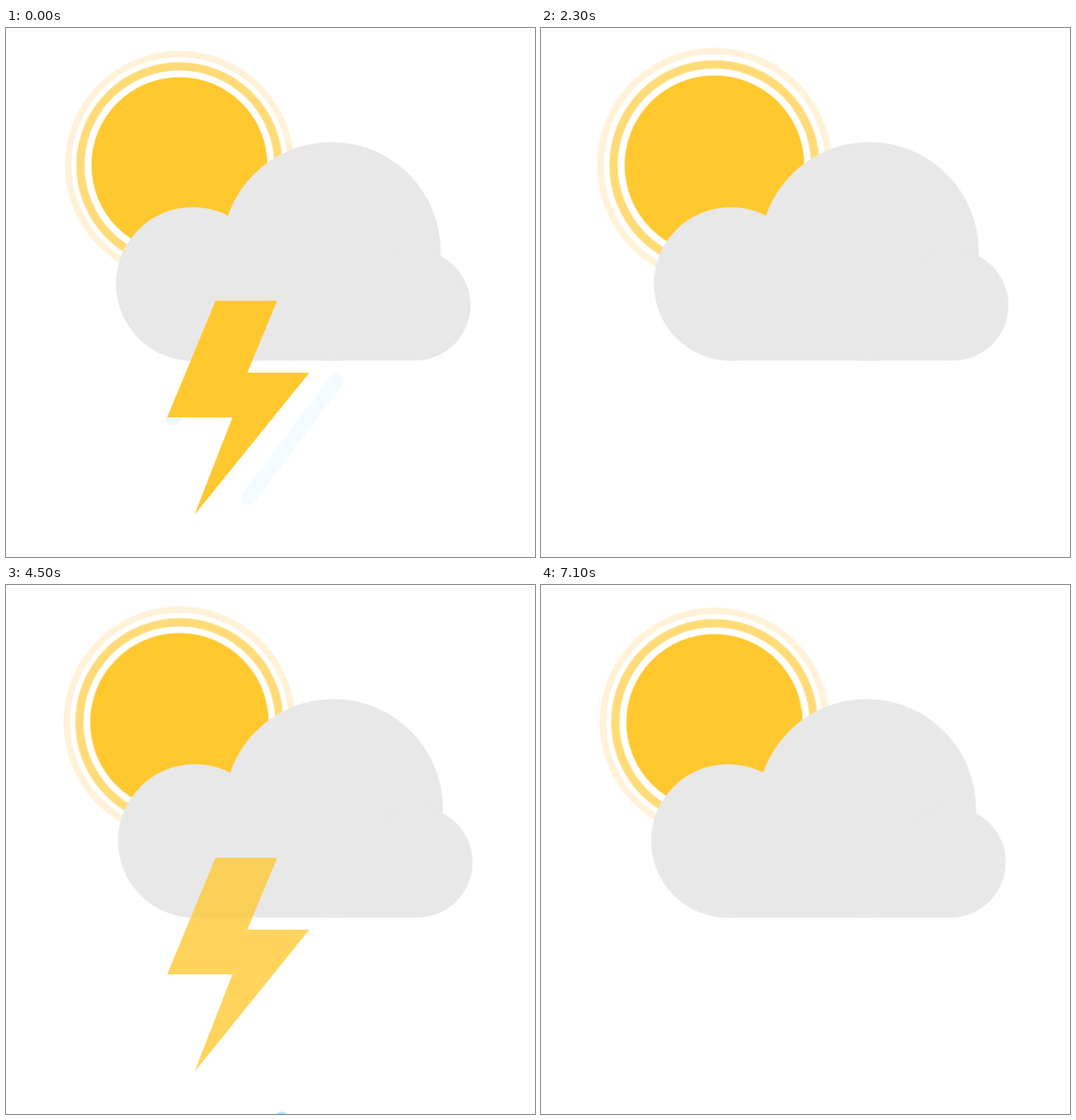
An HTML page for the animation above (7.2 s loop, 640x640 px).

```html
<!DOCTYPE html>
<html lang="en">
<head>
<meta charset="utf-8">
<title>Thunderstorm</title>
<style>
  html, body { margin: 0; width: 100%; height: 100%; overflow: hidden; background: #fff; }
  svg { display: block; width: 100%; height: 100%; }

  .core { fill: #ffc82f; animation: core 1.8s linear infinite alternate; }
  .ring { fill: none; stroke: #ffdb78; stroke-width: 10; animation: ring 1.8s linear -3.5s infinite alternate; }
  .halo { fill: none; stroke: #fff2d9; stroke-width: 8; animation: halo 7.2s linear infinite; }
  .cloud { fill: #e8e8e8; animation: drift 1.8s linear infinite alternate; }
  .drops { stroke: #abe8ff; stroke-width: 18; stroke-linecap: round; }
  .bolt { fill: #ffc82f; }

  @keyframes core { to { transform: scale(1.028); } }
  @keyframes ring { to { transform: scale(1.026); } }
  @keyframes halo {
    32% { transform: scale(1.026); }
    54% { transform: scale(1.006); }
    84% { transform: scale(1.029); }
  }
  @keyframes drift { to { transform: translateX(5px); } }
</style>
</head>
<body>
<svg viewBox="0 0 640 640">
  <g transform="translate(209.8 166)">
    <circle class="halo" r="134.6"/>
    <circle class="ring" r="119.6"/>
    <circle class="core" r="106.5"/>
  </g>
  <g class="cloud">
    <circle cx="226" cy="309.7" r="93"/>
    <circle cx="393.6" cy="270.3" r="132.4"/>
    <circle cx="495" cy="335.4" r="66.9"/>
    <rect x="226" y="310" width="269" height="92.4"/>
  </g>
  <g class="drops"></g>
  <polygon class="bolt" points="253.5,330 328,330 292,417 367,417 228,589 274,471 195,471"/>
</svg>
<script>
  const LOOP = 7200, SLOPE = 0.75, FADE = 2.4;
  const bolt = document.querySelector('.bolt');
  const layer = document.querySelector('.drops');

  // x, y: head of the streak at its start; len: its height
  const drops = [
    { x: 400, y: 426, len: 142, start: 28.2, end: 42, speed: 6.3, power: 1.53 },
    { x: 221.5, y: 445, len: 16, start: 27.9, end: 36, speed: 17.5 },
    { x: 445, y: 434, len: 102, start: 31, end: 43, speed: 23.3 },
    { x: 496, y: 430, len: 46, start: 32.5, end: 48, speed: 17.3 },
    { x: 265.3, y: 462, len: 46, start: 32.5, end: 41.05, speed: 17.3 }
  ];

  for (const d of drops) {
    d.el = document.createElementNS('http://www.w3.org/2000/svg', 'line');
    d.el.setAttribute('x2', -SLOPE * d.len);
    d.el.setAttribute('y2', d.len);
    layer.append(d.el);
  }

  // Linear rise from start, linear fall to end, clamped to 0..1
  const pulse = (t, start, end, rise = FADE, fall = rise) =>
    Math.max(0, Math.min(1, (t - start) / rise, (end - t) / fall));

  // Three showers per loop, in tenths of a second
  const shower = t =>
    t < 25 ? Math.min(t + 28.5, 48) :
    t < 48 ? t : Math.min(t - 23, 48);

  function draw(ms) {
    const t = shower(ms % LOOP / 100);
    bolt.setAttribute('opacity', pulse(t, 25, 35, 3) + pulse(t, 34.2, 47.5, 7.6, 3.2));
    for (const { el, x, y, start, end, speed, power = 1 } of drops) {
      const fall = speed * Math.max(0, t - start) ** power;
      el.setAttribute('transform', `translate(${x - SLOPE * fall} ${y + fall})`);
      el.setAttribute('opacity', pulse(t, start, end));
    }
  }

  let first;
  function tick(now) {
    first ??= now;
    draw(now - first);
    requestAnimationFrame(tick);
  }
  draw(0);
  requestAnimationFrame(tick);
</script>
</body>
</html>
```
